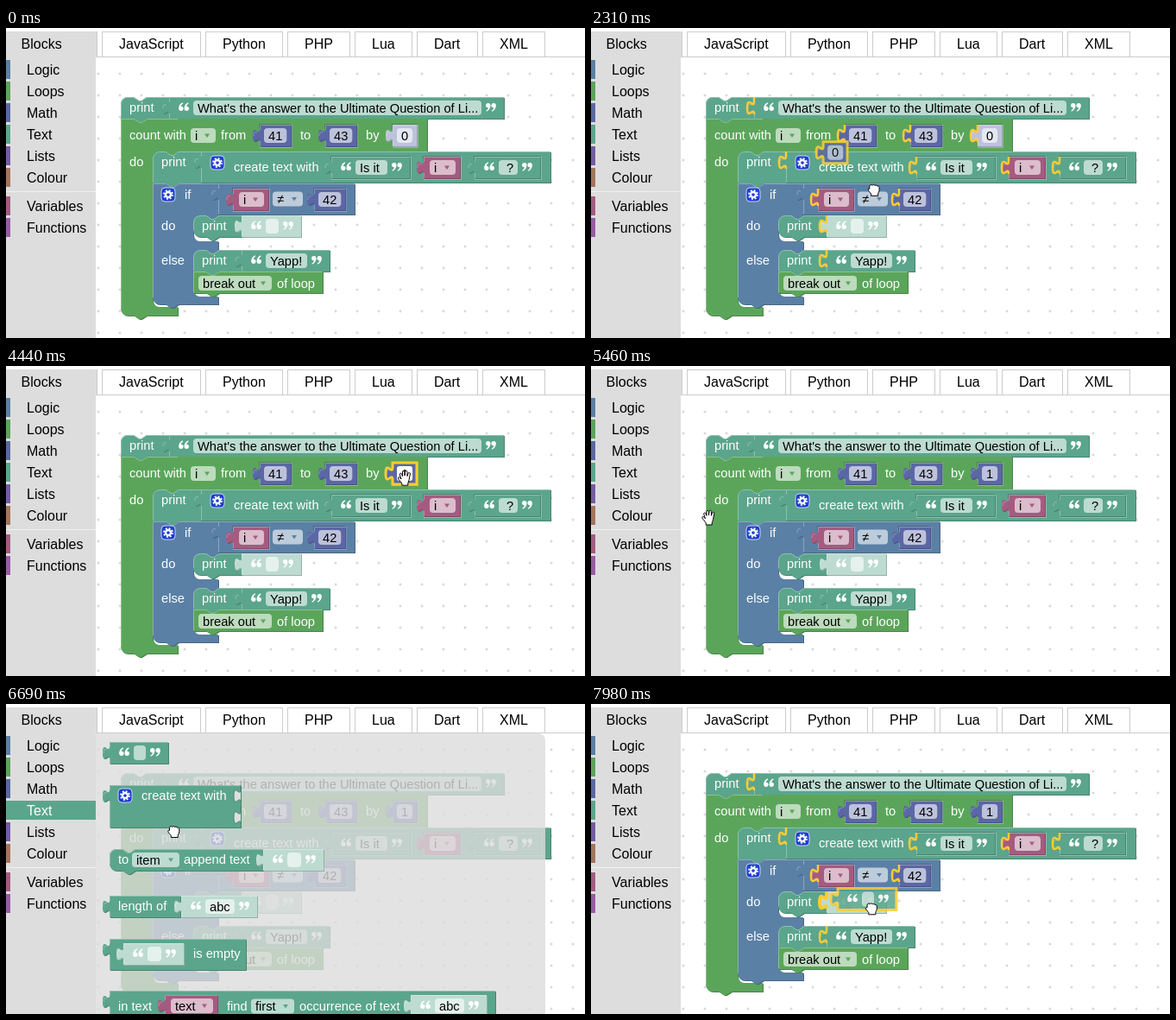
An HTML page for the animation above (8000 ms loop, 671 by 359 pixels).

```html
<!DOCTYPE html>
<html lang="en">
<head>
<meta charset="utf-8">
<title>Block editor</title>
<style>
  html, body { margin: 0; width: 100%; height: 100%; overflow: hidden; background: #fff; }
  svg { display: block; font: 14.67px "Liberation Sans", Arial, sans-serif; }
  .ui { font-size: 16px; }
  text { white-space: pre; }
</style>
</head>
<body>
<svg id="stage" width="671" height="359" viewBox="0 0 671 359"></svg>
<script>
const LOOP = 8000, LAG = 30;
const LOGIC = '#5b80a5', LOOPS = '#5ba55b', MATH = '#5b67a5', TEXT = '#5ba58c';
const LISTS = '#745ba5', COLOUR = '#a5745b', VARS = '#a55b80', FUNCS = '#995ba5', GOLD = '#fc3';

const mix = (hex, target, k) => '#' + [1, 3, 5].map(i => {
  const v = parseInt(hex.slice(i, i + 2), 16);
  return Math.round(v + (target - v) * k).toString(16).padStart(2, '0');
}).join('');

// ---- drawing helpers, all returning SVG markup ----
const label = (x, y, s, fill = '#fff') => `<text x="${x}" y="${y}" fill="${fill}">${s}</text>`;
const group = (id, inner, attrs = '') => `<g id="${id}" ${attrs}>${inner}</g>`;
const line = (d, stroke, width = 1) => `<path d="${d}" fill="none" stroke="${stroke}" stroke-width="${width}"/>`;
// Block outlines sit one pixel left of the grid their labels use.
const shape = inner => `<g transform="translate(-1 0)">${inner}</g>`;

const NOTCH = 'l6,4 3,0 6,-4', NOTCH_BACK = 'l-6,4 -3,0 -6,-4';
const tabPath = (x, y) => `M${x},${y}v5c0,10 -8,-8 -8,7.5s8,-2.5 8,7.5`;
const valuePath = (x, y, w, h) =>
  `M${x},${y}h${w}v${h}h${-w}V${y + 20}c0,-10 -8,8 -8,-7.5s8,2.5 8,-7.5z`;

function solid(d, colour, edge) {
  return shape(`<path d="${d}" transform="translate(1 1)" fill="${mix(colour, 0, .2)}"/>` +
    `<path d="${d}" fill="${colour}"/>` + line(edge, mix(colour, 255, .3)));
}

function value(x, y, w, h, colour) {
  const edge = `M${x + .5},${y + h - .5}V${y + 19}M${x - 7},${y + 13}q0,-6 4,-4M${x + .5},${y + 6}V${y + .5}H${x + w}`;
  return solid(valuePath(x, y, w, h), colour, edge);
}

// Light rim around a value that sits inside another block.
const socket = (x, y, w, h, colour) => shape(
  line(`M${x},${y + h + 1.5}h${w + 1.5}v${-h - 1.5}`, mix(colour, 255, .3)) +
  line(`M${x + w},${y - .5}H${x - .5}v5.5`, mix(colour, 0, .2)));

function stack(x, y, w, h, colour, first, last) {
  const top = first ? `M${x},${y + 8}a8,8 0 0 1 8,-8` : `M${x},${y}`;
  const end = last ? `H${x + 8}a8,8 0 0 1 -8,-8z` : `H${x}z`;
  const d = `${top}H${x + 15}${NOTCH}H${x + w}v${h}H${x + 30}${NOTCH_BACK}${end}`;
  const edge = `M${x + .5},${y + h - (last ? 8 : 1)}V${y + (first ? 8 : .5)}` +
    (first ? 'a7.5,7.5 0 0 1 7.5,-7.5' : '') + `H${x + 15}${NOTCH}H${x + w}`;
  return solid(d, colour, edge);
}

const mouth = (x, right, top, bottom) =>
  `H${right}V${top}H${x + 30}${NOTCH_BACK}H${x + 8}a8,8 0 0 0 -8,8V${bottom - 8}a8,8 0 0 0 8,8`;

function clamp(x, y, bottom, mouths, tail, colour) {
  const d = `M${x},${y}h15${NOTCH}` + mouths.join('') +
    `H${tail}V${bottom}H${x + 30}${NOTCH_BACK}H${x + 8}a8,8 0 0 1 -8,-8z`;
  return solid(d, colour, `M${x + .5},${bottom - 8}V${y + .5}h15${NOTCH}H${tail}`);
}

function field(x, mid, w, s, arrow) {
  return `<rect x="${x}" y="${mid - 8.5}" width="${w}" height="17" rx="4" fill="#fff" fill-opacity=".6"/>` +
    label(x + 5, mid + 5, s, '#000') +
    (arrow ? `<path d="M${x + w - 13},${mid - 2}h6l-3,4.5z" fill="${arrow}"/>` : '');
}

const COMMA = 'a2.8,2.8 0 0 1 5.5,0c0,3.6 -1.6,6.2 -4.6,7.4l-.5,-1.1c1.5,-.8 2.3,-2 2.4,-3.4a2.8,2.8 0 0 1 -2.8,-2.9z';
const quote = (x, mid, open) =>
  `<path d="M0,2.8${COMMA}M6.4,2.8${COMMA}" fill="#fff" transform="${open
    ? `translate(${x + 12} ${mid + 4}) rotate(180)` : `translate(${x} ${mid - 6})`}"/>`;

const tone = (colour, ghost) => ghost ? mix(colour, 255, .6) : colour;

function number(x, y, s, ghost) {
  const w = s.length * 8.15 + 20;
  return value(x, y, w, 25, tone(MATH, ghost)) + shape(field(x + 5, y + 12.5, w - 10, s));
}

function string(x, y, w, s = '', ghost) {
  const mid = y + 12.5;
  return value(x, y, w, 25, tone(TEXT, ghost)) + quote(x + 10, mid, true) +
    field(x + 27, mid, w - 54, s) + quote(x + w - 22, mid);
}

const variable = (x, y, w, s) => value(x, y, w, 25, VARS) + field(x + 6, y + 12.5, w - 12, s, VARS);

const gear = (x, y) => `<g transform="translate(${x + 8} ${y + 8})" fill="none" stroke="#fff">
  <rect x="-8" y="-8" width="16" height="16" rx="4" fill="#1d3fd0" stroke="#c6d4f4"/>
  <circle r="3" stroke-width="2.4"/><circle r="5" stroke-width="1.8" stroke-dasharray="2 1.93"/></g>`;

const printBlock = (x, y, h, first, last) =>
  stack(x, y, 56, h, TEXT, first, last) + label(x + 9, y + 17, 'print');

// ---- page chrome ----
function tabs() {
  const names = [['JavaScript', 111, 114], ['Python', 231, 89], ['PHP', 326, 72],
    ['Lua', 404, 66], ['Dart', 476, 70], ['XML', 552, 72]];
  return '<rect y="4" width="105" height="30" fill="#ddd"/>' + line('M105.5,4V34', '#ccc') +
    label(17.5, 24, 'Blocks', '#000') +
    names.map(([s, x, w]) =>
      `<rect x="${x + .5}" y="4.5" width="${w}" height="29" fill="#fff" stroke="#ccc"/>` +
      label(x + 20, 24, s, '#000')).join('') + line('M105,33.5H671', '#ccc');
}

const rows = [['Logic', LOGIC, 37], ['Loops', LOOPS, 62], ['Math', MATH, 87], ['Text', TEXT, 112],
  ['Lists', LISTS, 137], ['Colour', COLOUR, 162], ['Variables', VARS, 195], ['Functions', FUNCS, 220]];

const toolbox = () => '<rect y="33" width="104" height="326" fill="#ddd"/>' +
  line('M0,189.5H104', '#f0f0f0') +
  rows.map(([s, colour, y]) => `<g id="row${s}"><rect y="${y}" width="5" height="22" fill="${colour}"/>` +
    label(24, y + 17, s, '#000') + '</g>').join('');

// ---- the program on the workspace ----
function program() {
  const put = (make, x, y, w, h, parent) => socket(x, y, w, h, parent) + make;
  return printBlock(134, 80, 25, true) +
    string(190, 80, 388, 'What\'s the answer to the Ultimate Question of Li...') +

    clamp(134, 105, 333, [mouth(171, 489, 143, 323)], 200, LOOPS) +
    label(143, 129, 'count with') + field(214, 124.5, 29, 'i', LOOPS) + label(249, 129, 'from') +
    put(number(295, 112, '41'), 295, 112, 36, 25, LOOPS) + label(341, 129, 'to') +
    put(number(371, 112, '43'), 371, 112, 36, 25, LOOPS) + label(417, 129, 'by') +
    socket(449, 112, 28, 25, LOOPS) + group('stepGhost', number(449, 112, '0', true)) +
    group('step', number(449, 112, '0')) + group('stepOne', number(449, 112, '1')) +
    label(143, 160, 'do') +

    printBlock(171, 143, 37, true) + value(227, 143, 405, 36, TEXT) + gear(237, 148) +
    label(264, 166, 'create text with') +
    put(string(378, 149, 91, 'Is it'), 378, 149, 91, 25, TEXT) +
    put(variable(485, 149, 42, 'i'), 485, 149, 42, 25, TEXT) +
    put(string(544, 149, 76, ' ?'), 544, 149, 76, 25, TEXT) +

    clamp(171, 180, 320, [mouth(218, 247, 217, 247), mouth(218, 247, 257, 311)], 247, LOGIC) +
    gear(180, 185) + label(207, 198, 'if') + value(247, 180, 158, 36, LOGIC) +
    put(variable(264, 186, 41, 'i'), 264, 186, 41, 25, LOGIC) + field(309, 198, 35, '≠', LOGIC) +
    put(number(358, 186, '42'), 358, 186, 36, 25, LOGIC) +
    label(180, 234, 'do') + printBlock(218, 217, 25, true, true) + string(274, 217, 69, '', true) +
    label(180, 274, 'else') + printBlock(218, 257, 25, true) + string(274, 257, 102, 'Yapp!') +
    stack(218, 282, 150, 25, LOOPS) + field(223, 295.5, 85, 'break out', LOOPS) + label(314, 300.5, 'of loop');
}

// ---- flyouts ----
const panel = right => `<path d="M104,34H${right - 8}a8,8 0 0 1 8,8V359H104z" fill="#ddd" fill-opacity=".8"/>`;

const mathFlyout = () => panel(448) + number(121, 44, '0') +
  value(121, 94, 137, 36, MATH) + number(137, 99, '1', true) + field(170, 111.5, 35, '+', MATH) + number(219, 99, '1', true) +
  value(121, 154, 119, 25, MATH) + field(126, 167, 101, 'square root', MATH) + number(240, 154, '9', true) +
  value(121, 204, 63, 25, MATH) + field(126, 217, 44, 'sin', MATH) + number(184, 204, '45', true) +
  value(121, 255, 47, 25, MATH) + field(126, 267.5, 37, 'π', MATH) +
  value(121, 305, 134, 36, MATH) + number(137, 310, '0', true) + label(176, 328, 'is') + field(192, 322.5, 56, 'even', MATH);

function textFlyout() {
  const rim = mix(TEXT, 0, .2);
  return panel(625) + string(121, 44, 68) +
    value(121, 94, 152, 49, TEXT) + gear(130, 98) + label(157, 111, 'create text with') +
    shape([94, 119].map(y => `<path d="${tabPath(273, y)}" fill="#dedede" stroke="${rim}"/>`).join('')) +
    stack(121, 168, 178, 25, TEXT, true, true) + label(130, 185, 'to') + field(146, 180.5, 55, 'item', TEXT) +
    label(206, 185, 'append text') + string(299, 168, 70, '', true) +
    value(121, 222, 82, 25, TEXT) + label(130, 239, 'length of') + string(204, 222, 88, 'abc', true) +
    value(121, 272, 158, 36, TEXT) + string(137, 277, 70, '', true) + label(217, 294, 'is empty') +
    value(121, 332, 447, 36, TEXT) + label(130, 355, 'in text') + variable(185, 337, 61, 'text') +
    label(256, 355, 'find') + field(284, 350, 50, 'first', TEXT) + label(340, 355, 'occurrence of text') +
    string(470, 337, 88, 'abc', true);
}

// ---- connection marks, dragged blocks, cursors ----
const textInputs = [[190, 80], [227, 143], [378, 149], [485, 149], [544, 149],
  [264, 186], [358, 186], [274, 217], [274, 257]];
const numberInputs = [[295, 112], [371, 112], [449, 112]];
const marks = (list, width = 2.5) => shape(line(list.map(p => tabPath(...p)).join(''), GOLD, width));
const outline = (x, y, w) => shape(line(valuePath(x, y, w, 25), GOLD, 3));

const cursors = {
  arrow: 'M0,0V16.5l3.8,-3.6 2.4,5.8 2.6,-1.1 -2.5,-5.7h5.4z',
  fist: 'M-5,-5c0,-2.2 2.7,-2.6 3.2,-1.2c.5,-1.4 2.8,-1.2 3,.2c.6,-1.1 2.6,-.8 2.7,.6c1,-.5 2.4,0 2.4,1.4v3c0,2 -1.2,3 -1.5,4.4v2.4h-8v-2.2c-.8,-1.8 -3.6,-3 -3.4,-5c.2,-1.3 1.3,-1.2 1.6,-.8z',
  hand: 'M-4,1l-1.6,-5c-.5,-1.9 1.5,-2.5 2.1,-1l1,2.6v-4.6c0,-1.9 2.3,-1.9 2.5,0v4l.6,-4.5c.2,-1.7 2.4,-1.5 2.4,.2v4.8l1.1,-3.3c.6,-1.5 2.6,-.9 2.3,.8l-1.3,6.6c-.3,2 -1.1,3 -1.3,4.4v2.2h-7v-2c-1.4,-2.6 -3.6,-4 -4.3,-6.2c-.3,-1.5 1.4,-1.7 2.2,-.7z'
};

document.getElementById('stage').innerHTML = `
  <defs><pattern id="grid" x="-5.5" y="-9.5" width="25" height="25" patternUnits="userSpaceOnUse">
    <path d="M11,12.5h3M12.5,11v3" stroke="#ccc"/></pattern></defs>
  <rect width="671" height="359" fill="#fff"/>
  <rect x="104" y="34" width="567" height="325" fill="url(#grid)"/>` +
  group('tabs', tabs(), 'class="ui"') + group('toolbox', toolbox(), 'class="ui"') + program() +
  group('marksText', marks(textInputs)) + group('marksNumber', marks(numberInputs)) +
  group('nearStep', marks([[449, 112]], 4)) + group('nearPrint', marks([[274, 217]], 4)) +
  group('edit', '<rect x="453" y="116" width="18" height="17" rx="3" fill="#fff"/>' +
    group('editZero', '<rect x="457" y="117" width="10" height="15" fill="#3297fd"/>' + label(458, 129.5, '0')) +
    group('editOne', label(458, 129.5, '1', '#000'))) +
  group('selected', outline(449, 112, 28)) +
  group('flyMath', mathFlyout()) + group('flyText', textFlyout()) +
  group('dragNumber', number(121, 44, '0') + outline(121, 44, 28), 'opacity=".85"') +
  group('dragText', string(121, 44, 68) + outline(121, 44, 68), 'opacity=".85"') +
  Object.entries(cursors).map(([id, d]) =>
    group(id, `<path d="${d}" fill="#fff" stroke="#000" stroke-linejoin="round"/>`)).join('');

// ---- motion: time, x, y ----
const path = [
  [90, 638, 45], [150, 577, 56], [360, 400, 140], [540, 240, 205], [700, 115, 180], [870, 37, 113],
  [960, 32, 105], [1080, 68, 99], [1410, 68, 99], [1950, 143, 71], [2100, 143, 71],
  [2160, 174, 97], [2280, 291, 158], [2310, 327, 188], [2430, 400, 236], [2550, 425, 245],
  [2760, 450, 205], [3000, 485, 144], [3210, 479, 138], [3900, 479, 138], [4230, 462, 130],
  [4500, 462, 130], [4680, 475, 188], [4890, 465, 228], [5160, 465, 228], [5300, 300, 218],
  [5460, 137, 176], [5700, 40, 127], [5910, 40, 127], [6450, 160, 69], [6600, 160, 69],
  [6690, 194, 148], [6810, 262, 218], [7050, 312, 241], [7410, 335, 247], [7530, 349, 248],
  [7740, 349, 248], [7980, 325, 238], [8000, 325, 238]
];

const slope = (i, axis) => (path[i + 1][axis] - path[i][axis]) / (path[i + 1][0] - path[i][0]);
function tangent(i, axis) {
  if (i === 0 || i === path.length - 1) return 0;
  const a = slope(i - 1, axis), b = slope(i, axis);
  return a * b <= 0 ? 0 : 2 * a * b / (a + b);
}

function pointer(t) {
  t = Math.max(t, path[0][0]);
  let i = 0;
  while (i < path.length - 2 && t >= path[i + 1][0]) i++;
  const [t0] = path[i], dt = path[i + 1][0] - t0, u = (t - t0) / dt;
  return [1, 2].map(axis => {
    const a = path[i][axis], b = path[i + 1][axis];
    return a + (b - a) * u * u * (3 - 2 * u) +
      dt * u * (1 - u) * (tangent(i, axis) * (1 - u) - tangent(i + 1, axis) * u);
  });
}

// Right edge of the program at a given height.
function programEdge(y) {
  if (y < 80 || y > 333) return 0;
  return y < 105 ? 577 : y < 143 ? 488 : y < 180 ? 631 : y < 217 ? 404 : y < 308 ? 368 : 246;
}

const parts = {};
document.querySelectorAll('#stage g[id]').forEach(g => parts[g.id] = g);
const show = (id, on) => parts[id].setAttribute('display', on ? 'inline' : 'none');
const move = (id, x, y) => parts[id].setAttribute('transform', `translate(${x.toFixed(2)} ${y.toFixed(2)})`);

function selectRow(name, on) {
  const [rect, text] = parts['row' + name].children;
  rect.setAttribute('width', on ? 104 : 5);
  text.setAttribute('fill', on ? '#fff' : '#000');
}

function render(t) {
  const within = (a, b) => t >= a && t < b;
  const math = within(1260, 2160), text = within(5910, 6720);
  const dragNumber = within(2160, 3900), dragText = t >= 6720;

  show('flyMath', math);
  show('flyText', text);
  selectRow('Math', math);
  selectRow('Text', text);
  show('marksText', dragNumber || dragText);
  show('marksNumber', dragNumber);
  show('nearStep', within(2970, 3900));
  show('nearPrint', t >= 7830);
  show('stepGhost', t < 3900);
  show('step', within(3900, 4440));
  show('stepOne', t >= 4440);
  show('selected', within(3900, 4920));
  show('edit', within(4260, 4920));
  show('editZero', t < 4440);
  show('editOne', t >= 4440);

  const [bx, by] = pointer(t - LAG);
  show('dragNumber', dragNumber);
  show('dragText', dragText);
  move('dragNumber', bx - 143, by - 71);
  move('dragText', bx - 160, by - 69);

  const [x, y] = pointer(t);
  const held = within(2100, 3900) || t >= 6600;
  const overBlock = math || text ? x >= 113 && y <= 75 : x >= 133 && x < programEdge(y);
  const kind = held ? 'fist' : overBlock ? 'hand' : 'arrow';
  for (const id in cursors) {
    show(id, t >= 90 && id === kind);
    move(id, x, y);
  }
}

const start = performance.now();
function tick() {
  render((performance.now() - start) % LOOP);
  requestAnimationFrame(tick);
}
tick();
</script>
</body>
</html>
```
